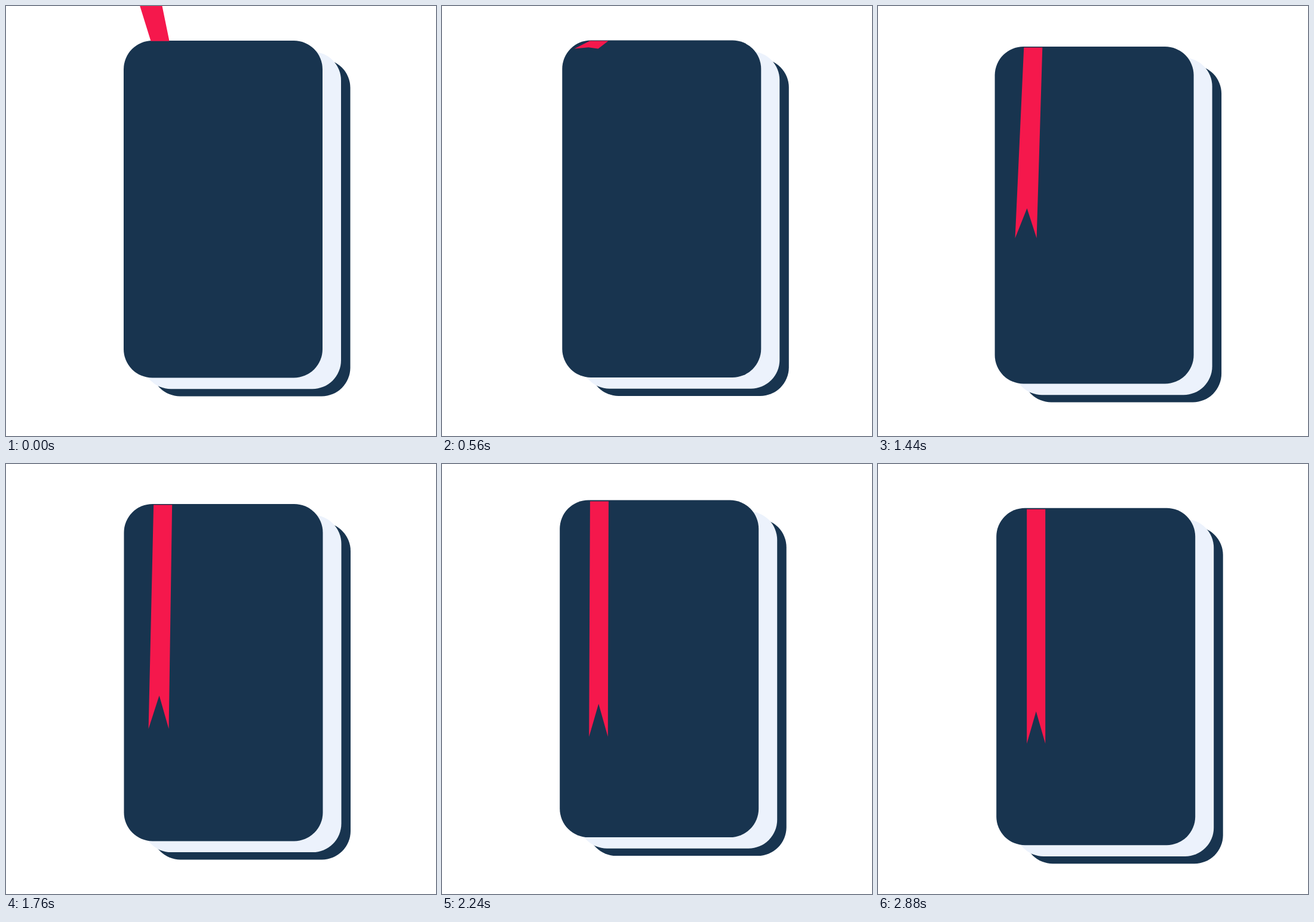
Animation of 720 by 720 pixels, one loop 2.96 s. Source, as an HTML page:

```html
<!DOCTYPE html>
<html lang="en">
<head>
<meta charset="utf-8">
<title>Book with ribbon</title>
<style>
  html, body { margin: 0; width: 100%; height: 100%; overflow: hidden; background: #fff; }
  svg { display: block; width: 100%; height: 100%; }
  rect { width: 333px; height: 564.5px; rx: 48px; }
  .cover { fill: #18344f; }
  .pages { fill: #ecf2fc; }
  .ribbon { fill: #f5184c; }
</style>
</head>
<body>
<svg viewBox="0 0 720 720">
  <g id="book">
    <rect class="cover" x="46.5" y="31"/>
    <rect class="pages" x="31" y="18.7"/>
    <rect class="cover"/>
    <polygon class="ribbon" id="ribbon"/>
  </g>
</svg>
<script>
const LOOP = 2960, STEP = 80, FALL = 2600, DRIFT = 480;
const book = document.getElementById('book');
const ribbon = document.getElementById('ribbon');

// The book drifts through one point every DRIFT ms
const driftX = [197, 201.6, 196.7, 195.6, 198.2, 196.8, 198.2];
const driftY = [58, 56.7, 63.9, 68, 65.6, 60, 73.7];

// Smooth curve through evenly spaced values
function drift(values, t) {
  const last = values.length - 1;
  const i = Math.min(Math.floor(t / DRIFT), last - 1);
  const u = t / DRIFT - i;
  const slope = k => {
    const from = Math.max(k - 1, 0), to = Math.min(k + 1, last);
    return (values[to] - values[from]) / (to - from);
  };
  const a = values[i], b = values[i + 1];
  return a + (b - a) * smooth(u)
    + slope(i) * u * (1 - u) ** 2 - slope(i + 1) * u * u * (1 - u);
}

function smooth(u) {
  return u * u * (3 - 2 * u);
}

// The ribbon is a flat strip hinged at the top edge, seen in perspective
const WIDTH = 31, LENGTH = 392.5, NOTCH = 0.8624, EYE = 1750, EYE_X = 75, EYE_Y = 230;

function ribbonPoints(t) {
  const lift = 1 - smooth(Math.min(t / FALL, 1));
  const angle = lift * 92 * Math.PI / 180;
  const centerX = 66.5 - 5.5 * lift;
  const top = 2 - 1.2 * lift;
  const point = (side, along) => {
    const depth = along * LENGTH * Math.sin(angle);
    const scale = EYE / (EYE - depth);
    const x = centerX + EYE_X + (side * WIDTH / 2 - EYE_X) * scale;
    const y = top + EYE_Y + (along * LENGTH * Math.cos(angle) - EYE_Y) * scale;
    return `${x.toFixed(2)},${y.toFixed(2)}`;
  };
  return [point(-1, 0), point(1, 0), point(1, 1), point(0, NOTCH), point(-1, 1)].join(' ');
}

function draw(time) {
  const t = Math.floor((time % LOOP) / STEP) * STEP;
  book.setAttribute('transform', `translate(${drift(driftX, t)} ${drift(driftY, t)})`);
  ribbon.setAttribute('points', ribbonPoints(t));
}

const start = performance.now();
function tick() {
  draw(performance.now() - start);
  requestAnimationFrame(tick);
}
tick();
</script>
</body>
</html>
```
